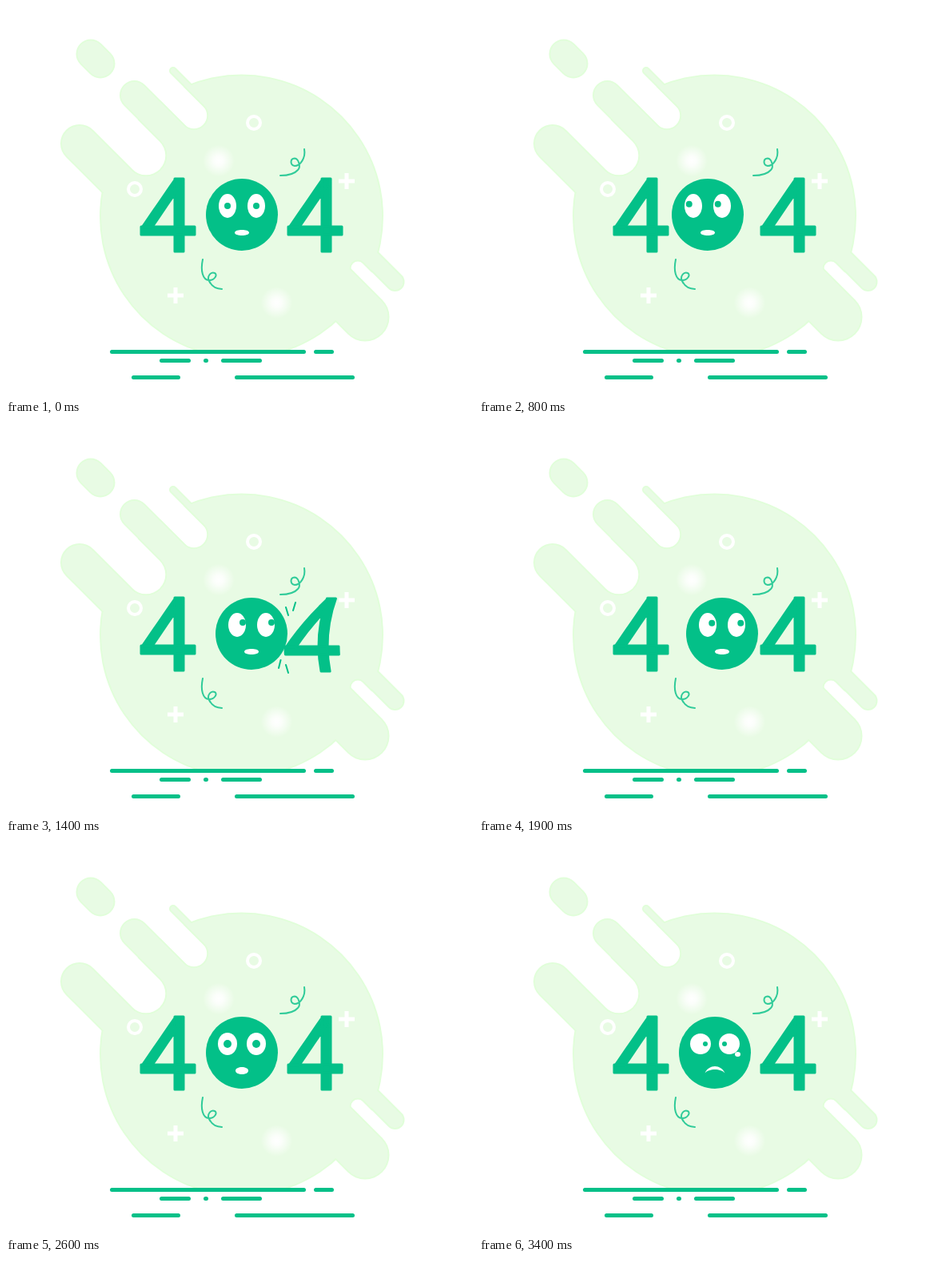
These frames come from a looping animation (584 by 489 pixels, 5400 ms). An HTML page:

```html
<!DOCTYPE html>
<html lang="en">
<head>
<meta charset="utf-8">
<title>404</title>
<style>
  html, body { margin: 0; width: 100%; height: 100%; overflow: hidden; background: #fff; }
  svg { display: block; }
  .line { fill: none; stroke: #03c088; stroke-linecap: round; }
  .digit { fill: #03c088; stroke: #03c088; stroke-width: 3; stroke-linejoin: round; }
  .deco { fill: none; stroke: #fff; }
</style>
</head>
<body>
<svg width="584" height="489" viewBox="0 0 584 489">
  <defs>
    <radialGradient id="glow">
      <stop offset="0" stop-color="#fff"/>
      <stop offset=".3" stop-color="#fff" stop-opacity=".85"/>
      <stop offset="1" stop-color="#fff" stop-opacity="0"/>
    </radialGradient>
  </defs>
  <g id="backdrop"></g>
  <g fill="url(#glow)">
    <circle cx="266" cy="193.5" r="20"/>
    <circle cx="338.5" cy="371" r="20"/>
  </g>
  <g class="deco" stroke-width="4">
    <circle cx="310" cy="146" r="8"/>
    <circle cx="161" cy="229" r="8"/>
  </g>
  <path class="deco" stroke-width="5" d="M416 219h20m-10-10v20M202 362h20m-10-10v20"/>
  <g class="line" stroke-width="2" opacity=".8">
    <path d="M373 179C375 190 368 200 361 200C355 199 355 191 361 190.5C366 191 369 201 365 205C360 211 351 212 343 212"/>
    <path d="M246 317C243 331 246 343 254 343C261 343 265 336 261 334C256 332 251 338 254 344C257 350 263 354 270 354"/>
  </g>
  <path class="line" stroke-width="5" d="M132.5 432.5h240m15 0h20M194.5 443.5h34m21 0h1m21 0h46M159.5 464.5h56m73 0h145"/>

  <path class="digit" id="left"/>
  <path class="digit" id="right"/>
  <path class="line" id="marks" stroke-width="2" d="M228 222l3 10m9-4l-3 10M246.500 294l2.500 10m-9-4l-3 10"/>
  <g id="face">
    <circle cx="295" cy="261" r="45" fill="#03c088"/>
    <g fill="#fff">
      <ellipse class="eye" cx="277" cy="250"/>
      <ellipse class="eye" cx="313" cy="250"/>
      <path id="mouth"/>
      <ellipse id="tear" cx="323.5" cy="263"/>
    </g>
    <g fill="#03c088">
      <circle class="pupil"/>
      <circle class="pupil"/>
    </g>
  </g>
</svg>
<script>
const LOOP = 5400, STEP = 100, REACH = 12;
const $ = id => document.getElementById(id);
const all = cls => [...document.getElementsByClassName(cls)];
const eyes = all('eye'), pupils = all('pupil');

const set = (el, attrs) => {
  for (const name in attrs) el.setAttribute(name, attrs[name]);
};
const mix = (a, b, k) => a + (b - a) * k;
const ramp = (n, from, to) => Math.min(1, Math.max(0, (n - from) / (to - from)));

// Diagonal capsules: x, y of one end, run along both axes, radius
const ARMS = [[106, 60, 12, 18.5], [160.5, 111.5, 90, 18.5], [92, 172, 90, 24],
  [209, 81, 50, 5], [486.5, 345, -60, 12], [449, 389, -60, 30.5]];
const NOTCHES = [[175, 187, -45, 24.3], [235, 137, -35, 16.2], [440, 328, 45, 8.5]];

const capsules = (list, color, grow) => list.map(([x, y, run, r]) =>
  `<path d="M${x} ${y}l${run} ${run}" stroke="${color}" stroke-width="${2 * (r + grow)}"/>`).join('');

const layer = (inset, fill) => `
  <mask id="blob${inset}" maskUnits="userSpaceOnUse" width="584" height="489" stroke-linecap="round">
    <circle cx="294.5" cy="263" r="${177.5 - inset}" fill="#fff"/>
    ${capsules(NOTCHES, '#000', inset)}${capsules(ARMS, '#fff', -inset)}
  </mask>
  <rect width="584" height="432" fill="${fill}" mask="url(#blob${inset})"/>`;

$('backdrop').innerHTML = layer(0, '#e1feda') + layer(2, '#e8fbe4');

// The 4 is a stem, a bar and a slanted stroke
const box = (x, y, w, h) => [[x, y], [x + w, y], [x + w, y + h], [x, y + h]];
const FOUR = [
  box(211, 216, 11, 91),
  box(169, 276, 67, 10),
  [[212, 216], [222, 219], [182.5, 277], [170, 277]]
];

// bend (-1, 0 or 1) bows the digit sideways
function four(dx, bend) {
  const warp = (x, y) => [
    x + dx + bend * (4 - .003 * (y - 275) ** 2),
    y + Math.abs(bend)
  ].map(v => v.toFixed(2)).join(' ');
  return FOUR.map(ring => 'M' + ring.flatMap(([x, y], i) => {
    const [u, v] = ring[(i + 1) % ring.length];
    return [0, 1, 2, 3, 4, 5].map(n => warp(mix(x, u, n / 6), mix(y, v, n / 6)));
  }).join('L') + 'Z').join('');
}

function mouth(wide, sad) {
  const w = mix(9 - 2 * wide, 12.5, sad), c = w * mix(1, .6, sad);
  const h = (3.5 + 2 * wide) * 4 / 3;
  const y = mix(283.5, 286.5, sad);
  const top = mix(283.5 - h, 275, sad), low = mix(283.5 + h, 280.5, sad);
  return `M${295 - w} ${y}C${295 - c} ${top} ${295 + c} ${top} ${295 + w} ${y}` +
    `C${295 + c} ${low} ${295 - c} ${low} ${295 - w} ${y}Z`;
}

// Two swings of 11 steps, left then right: out, rest against the digit, back
function swing(n) {
  if (n >= 22) return 0;
  const k = n % 11;
  const push = Math.min(REACH, Math.round(4.4 * Math.min(k, 10 - k)));
  return n < 11 ? -push : push;
}

function draw(t) {
  const n = Math.floor(t / STEP);
  const beat = n < 32 ? n - n % 2 : n; // the face changes at half pace at first
  const shift = swing(n), wide = ramp(beat, 24, 28), sad = ramp(beat, 29, 34);
  const hitLeft = shift === -REACH, hitRight = shift === REACH;

  set($('left'), { d: four(0, hitLeft ? 1 : 0) });
  set($('right'), { d: four(184, hitRight ? -1 : 0) });
  set($('marks'), {
    visibility: hitLeft || hitRight ? 'visible' : 'hidden',
    transform: hitRight ? 'translate(590 0) scale(-1 1)' : ''
  });

  set($('face'), { transform: `translate(${shift} 0)` });
  eyes.forEach(eye => set(eye, { rx: 11 + 2 * wide, ry: 15 - 2 * wide }));
  pupils.forEach((pupil, i) => set(pupil, {
    cx: 277 + 36 * i + shift * 7 / 12 + (i ? -6 : 6) * sad,
    cy: 250 - Math.abs(shift) / 4,
    r: 4 + 2 * wide - 3 * sad
  }));
  set($('mouth'), { d: mouth(wide, sad) });
  set($('tear'), { rx: 3.5 * sad, ry: 3 * sad });
}

const start = performance.now();
function tick() {
  draw((performance.now() - start) % LOOP);
  requestAnimationFrame(tick);
}
tick();
</script>
</body>
</html>
```
